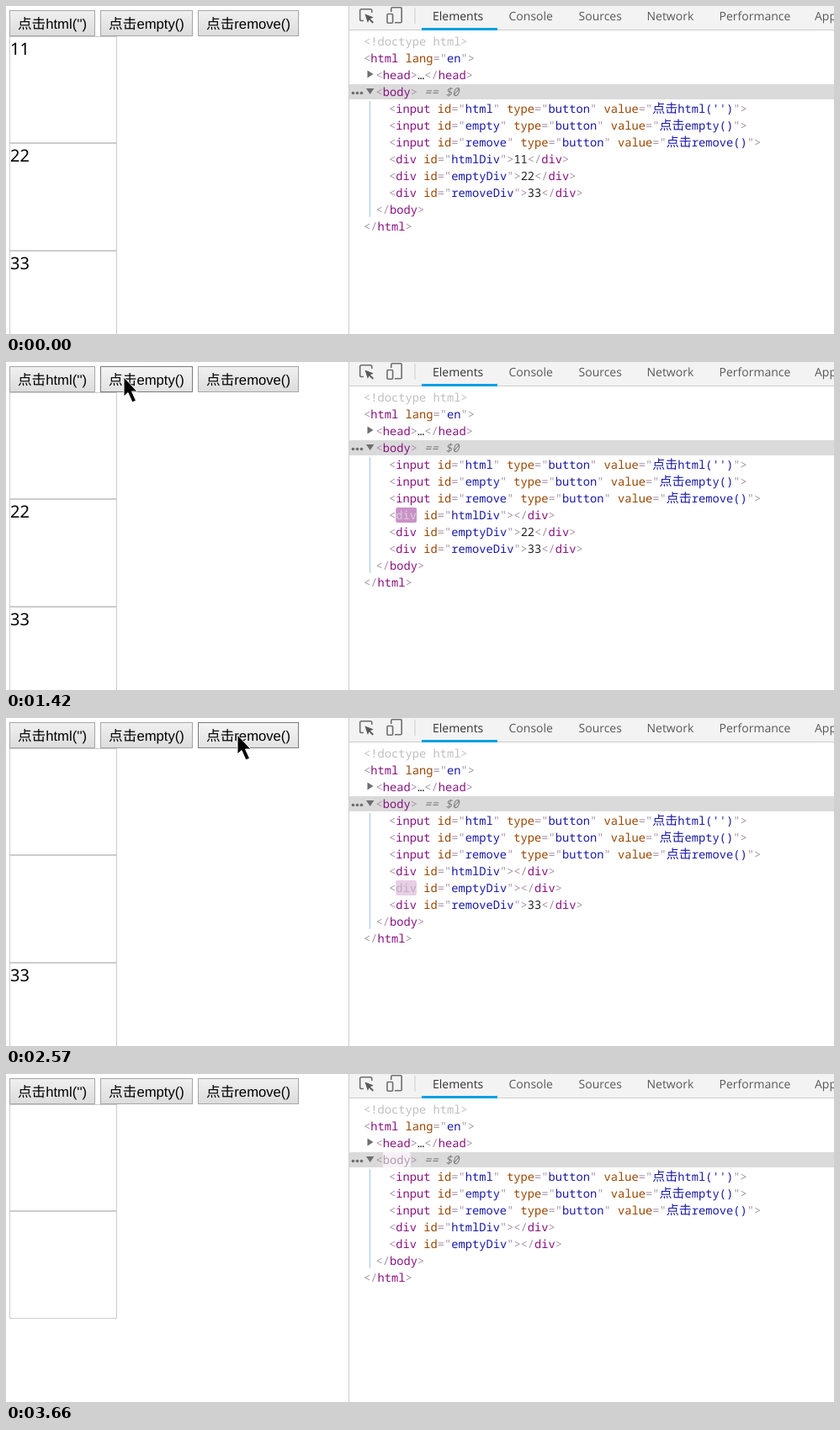
These frames come from a looping animation (984x390 px, 3.73 s). An HTML page:

```html
<!DOCTYPE html>
<html lang="zh">
<head>
<meta charset="utf-8">
<style>
html, body { margin: 0; width: 100%; height: 100%; overflow: hidden; background: #fff; }
svg { display: block; }
text { white-space: pre; text-rendering: geometricPrecision; }
.code { font: 13.745px "Noto Sans Mono", "DejaVu Sans Mono", monospace; fill: #a894a6; }
.cjk { font-family: "Noto Sans CJK SC", "Noto Sans CJK", sans-serif; font-size: 15px; }
.btn { font: 16.667px "Liberation Sans", "Noto Sans CJK SC", "Noto Sans CJK", sans-serif; text-anchor: middle; }
.page { font: 20px "Noto Sans", sans-serif; }
.tab { font: 14px "Open Sans", sans-serif; fill: #5a5a5a; }
</style>
</head>
<body>
<svg id="stage" width="984" height="390" viewBox="0 0 984 390"></svg>
<script>
const LOOP = 3730, CHAR = 8.247, FADE = 1220;
const CLICKS = { html: 1250, empty: 1880, remove: 2650 };
const LEAVE = 2730;

// The screen refreshes only at these moments.
const STEPS = [0, 770, 850, 1010, 1090, 1160, 1250, 1330, 1420, 1490, 1640, 1720, 1800, 1880,
  1950, 2030, 2100, 2180, 2340, 2420, 2500, 2580, 2650, 2730, 2800, 2880, 2950, 3030, 3100, 3260, 3660];

// Pointer path: time, x, y
const PATH = [[770, 44, 34], [850, 38, 22], [1250, 38, 22], [1420, 140, 18], [1490, 150, 19],
  [1640, 156, 20], [1880, 158, 20], [2100, 271, 21], [2180, 275, 20], [LEAVE, 275, 20]];

const BUTTONS = [['html', "html('')", 4, 102], ['empty', 'empty()', 112, 110], ['remove', 'remove()', 228, 120]];
const BOXES = [['html', '11', 36, 127], ['empty', '22', 163, 128], ['remove', '33', 291, 128]];
const TABS = [['Elements', 507], ['Console', 597.5], ['Sources', 680.5], ['Network', 761.5],
  ['Performance', 847.5], ['Application', 961]];

const rect = (x, y, w, h, fill, more = '') => `<rect x="${x}" y="${y}" width="${w}" height="${h}" fill="${fill}" ${more}/>`;
const frame = (x, y, w, h, fill, stroke) => rect(x + .5, y + .5, w - 1, h - 1, fill, `stroke="${stroke}"`);
const text = (cls, x, y, s, more = '') => `<text class="${cls}" x="${x}" y="${y}" ${more}>${s}</text>`;
const ink = (color, s, more = '') => `<tspan fill="${color}" ${more}>${s}</tspan>`;
const mix = (a, b, p) => `rgb(${a.map((v, i) => Math.round(v + (b[i] - v) * p))})`;

function pointer(t) {
  if (t < PATH[0][0] || t >= LEAVE) return null;
  const i = PATH.findIndex(k => k[0] > t);
  const [t0, x0, y0] = PATH[i - 1], [t1, x1, y1] = PATH[i];
  const p = (t - t0) / (t1 - t0);
  return [x0 + (x1 - x0) * p, y0 + (y1 - y0) * p];
}

function drawPage(t, tip) {
  let out = '';
  for (const [id, label, y, h] of BOXES) {
    const done = t >= CLICKS[id];
    if (done && id === 'remove') continue;
    out += frame(4, y, 128, h, 'none', '#ccc');
    if (!done) out += text('page', 5, y + 22, label);
  }
  for (const [id, label, x, w] of BUTTONS) {
    const over = tip && tip[0] >= x && tip[0] < x + w && tip[1] < 36;
    const down = over && t >= CLICKS[id] - 90 && t < CLICKS[id];
    out += frame(x, 5, w, 31, down ? '#dedede' : over ? 'url(#hover)' : 'url(#face)', over ? '#7b7b7b' : '#a6a6a6');
    out += text('btn', x + w / 2, 27, '点击' + label);
  }
  return out;
}

function drawToolbar() {
  let out = rect(407, 0, 1, 390, '#ccc') + rect(408, 0, 576, 28, '#f3f3f3') + rect(408, 28, 576, 1, '#ccc');
  out += `<g fill="none" stroke="#6e6e6e" stroke-width="1.6">
    <path d="M425 17.5H422.5Q420.7 17.5 420.7 15.7V5.6Q420.7 3.8 422.5 3.8H433Q434.8 3.8 434.8 5.6V8"/>
    <path d="M457.8 7V3Q457.8 1.8 459 1.8H469Q470.2 1.8 470.2 3V18.5Q470.2 19.7 469 19.7H462"/>
    <rect x="453" y="9.5" width="6.6" height="10.7" rx="1"/></g>
    <path d="M426.5 9.5L436.8 13.6L432.9 15.2L437 19.3L435.6 20.7L431.5 16.6L429.9 20Z" fill="#5a5a5a"/>`;
  out += rect(485.5, 2, 1, 19, '#ccc') + rect(494, 26, 90, 3, '#03a1e3');
  TABS.forEach(([s, x], i) => out += text('tab', x, 17, s, i ? '' : 'style="fill:#333"'));
  return out;
}

function drawTree(t) {
  const removed = t >= CLICKS.remove;
  let row = 0, out = rect(408, 93, 576, 18, '#dadada');
  out += rect(432, 113, 1, removed ? 118 : 138, '#a9c6ea');
  for (const x of [412.5, 417.5, 422.5]) out += `<circle cx="${x}" cy="103.5" r="1.8" fill="#6e6e6e"/>`;
  out += '<path d="M429.5 76.5L436.5 81L429.5 85.5ZM428 98H437.4L432.7 105Z" fill="#6e6e6e"/>';

  const name = s => ink('#881280', s);
  const attr = (k, v) => ' ' + ink('#994500', k) + '="' + ink('#1a1aa6', v) + '"';
  const close = s => '&lt;/' + name(s) + '&gt;';
  const line = (x, s) => out += text('code', x, 47 + 20 * row++, s);

  // Opening tag whose name flashes after a change at time `since`.
  const open = (x, s, attrs, since) => {
    const u = (t - since) / FADE;
    if (!(u >= 0 && u < 1)) return '&lt;' + name(s) + attrs + '&gt;';
    const p = u ** .4;
    out += rect(x + CHAR, 33 + 20 * row, s.length * CHAR, 18, mix([158, 54, 153], [255, 255, 255], p), 'rx="2"');
    return '&lt;' + ink(mix([255, 255, 255], [168, 148, 166], p), s) + attrs + '&gt;';
  };

  line(425, ink('#c0c0c0', '&lt;!doctype html&gt;'));
  line(425, open(425, 'html', attr('lang', 'en')));
  line(439.5, open(439.5, 'head', '') + ink('#222', '…') + close('head'));
  line(439.5, open(439.5, 'body', '', CLICKS.remove) + ink('#7f7f7f', ' == $0', 'font-style="italic"'));
  for (const [id, label] of BUTTONS) {
    const value = '<tspan class="cjk">点击</tspan>' + label;
    line(455, open(455, 'input', attr('id', id) + attr('type', 'button') + attr('value', value)));
  }
  for (const [id, label] of BOXES) {
    if (removed && id === 'remove') continue;
    const body = t < CLICKS[id] ? ink('#222', label) : '';
    line(455, open(455, 'div', attr('id', id + 'Div'), CLICKS[id]) + body + close('div'));
  }
  line(439.5, close('body'));
  line(425, close('html'));
  return out;
}

const gradient = (id, a, b) => `<linearGradient id="${id}" x2="0" y2="1"><stop stop-color="${a}"/><stop offset="1" stop-color="${b}"/></linearGradient>`;
const DEFS = `<defs>${gradient('face', '#f0f0f0', '#dcdcdc')}${gradient('hover', '#f4f4f4', '#e2e2e2')}</defs>`;

function render(t) {
  const tip = pointer(t);
  let out = DEFS + drawPage(t, tip) + drawToolbar() + drawTree(t);
  if (tip) out += `<path transform="translate(${tip})" d="M0 0V23L5 18.5L10 30L14.5 28L9.5 17H16Z" stroke="#fff" stroke-width="1"/>`;
  stage.innerHTML = out;
}

const stage = document.getElementById('stage');
const start = performance.now();
let shown = -1;
function tick() {
  const t = (performance.now() - start) % LOOP;
  const step = STEPS.filter(s => s <= t).pop();
  if (step !== shown) render(shown = step);
  requestAnimationFrame(tick);
}
tick();
</script>
</body>
</html>
```
